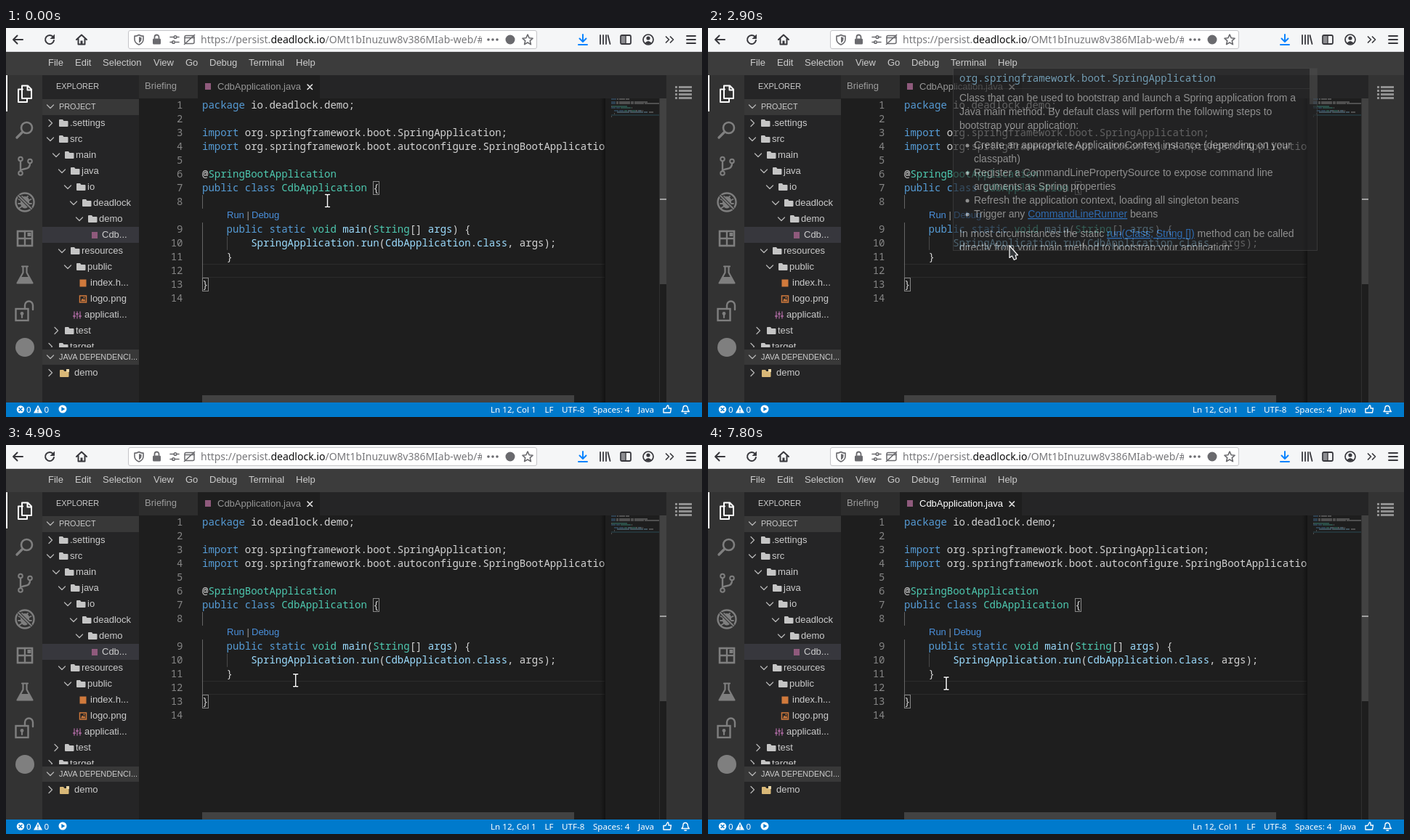
Animation of 958x536 px, one loop 8 s. Source, as an HTML page:

```html
<!DOCTYPE html>
<html lang="en">
<head>
<meta charset="utf-8">
<title>Editor session</title>
<style>
html, body { margin: 0; width: 100%; height: 100%; overflow: hidden; background: #1e1e1e; }
svg { display: block; width: 958px; height: 536px; }
text { white-space: pre; font: 13px "Liberation Sans", Arial, sans-serif; fill: #ccc; }
text.code { font: 14px "Noto Sans Mono", monospace; fill: #d4d4d4; }
text.num { fill: #858585; text-anchor: end; }
text.head { font-size: 10.83px; }
text.doc { font-size: 14px; }
text.status { font: 11.6px "Noto Sans", "Open Sans", sans-serif; fill: #fff; }
text.url { font: 14px "Noto Sans", "Open Sans", sans-serif; fill: #77777a; }
.link { fill: #3794ff; text-decoration: underline; }
.line { fill: none; stroke-linecap: round; stroke-linejoin: round; }
</style>
</head>
<body>
<svg id="stage" viewBox="0 0 958 536"></svg>
<script>
const stage = document.getElementById('stage');
const rect = (x, y, w, h, fill, more = '') =>
  `<rect x="${x}" y="${y}" width="${w}" height="${h}" fill="${fill}" ${more}/>`;
const box = (x, y, w, h, stroke, more = '') => rect(x, y, w, h, 'none', `stroke="${stroke}" ${more}`);
const text = (x, y, s, cls = '', more = '') => `<text x="${x}" y="${y}" class="${cls}" ${more}>${s}</text>`;
const line = (d, stroke, w = 1, more = '') =>
  `<path class="line" d="${d}" stroke="${stroke}" stroke-width="${w}" ${more}/>`;
const shape = (d, fill, more = '') => `<path d="${d}" fill="${fill}" ${more}/>`;
const dot = (x, y, r, fill, more = '') => `<circle cx="${x}" cy="${y}" r="${r}" fill="${fill}" ${more}/>`;
const ring = (x, y, r, stroke, w = 1) => dot(x, y, r, 'none', `stroke="${stroke}" stroke-width="${w}"`);
const group = (id, body, more = '') => `<g id="${id}" ${more}>${body}</g>`;

const KEY = '#569cd6', TYPE = '#4ec9b0', NAME = '#9cdcfe', PLAIN = '#d4d4d4';
const CHAR = 8.4;

// Each line is a list of [text, colour] runs.
const source = [
  [['package', KEY], [' io.deadlock.demo;', PLAIN]],
  [],
  [['import', KEY], [' org.springframework.boot.SpringApplication;', PLAIN]],
  [['import', KEY], [' org.springframework.boot.autoconfigure.SpringBootApplication;', PLAIN]],
  [],
  [['@', PLAIN], ['SpringBootApplication', TYPE]],
  [['public class ', KEY], ['CdbApplication', TYPE], [' {', PLAIN]],
  [],
  [['    public static ', KEY], ['void', TYPE], [' main', NAME], ['(', PLAIN], ['String', TYPE],
    ['[] ', PLAIN], ['args', NAME], [') {', PLAIN]],
  [['        SpringApplication', NAME], ['.', PLAIN], ['run', NAME], ['(', PLAIN], ['CdbApplication', NAME],
    ['.', PLAIN], ['class', NAME], [', args);', PLAIN]],
  [['    }', PLAIN]],
  [],
  [['}', PLAIN]],
  []
];
const lineTop = i => 97 + 19 * i + (i > 7 ? 19 : 0);

function browser() {
  const ink = '#38383d', grey = '#6a6a6e';
  return rect(0, 0, 958, 33, '#f5f6f7') + rect(0, 32, 958, 1, '#d5d5d8') +
    line('M23 16H10M15.500 10.500L10 16l5.500 5.500', ink, 2) +
    line('M65 12.500A6 6 0 1 0 66 17', ink, 2) + shape('M67 8.500v6.500h-6.500z', ink) +
    line('M97 16l7-6.500 7 6.500M99.500 15v7.500h9V15', ink, 2) + rect(102.5, 17.5, 3, 5, ink) +
    rect(168.5, 3.5, 562, 25, '#fff', 'rx="2.500" stroke="#c4c4c8"') +
    line('M183 9.500q3 2 6 1.500v4.500q0 5-6 7.500q-6-2.500-6-7.500v-4.500q3 .5 6-1.500z', grey, 1.6) +
    shape('M183 12v8.500q3.500-2 3.500-5v-2.500q-2 0-3.500-1z', grey) +
    rect(202, 14.5, 11, 8, grey, 'rx="1.500"') + line('M204.500 14v-1.500a3 3 0 0 1 6 0v1.500', grey, 1.8) +
    line('M226 12.500h5M235 12.500h3M226 19.500h3M233 19.500h5', grey, 1.6) +
    ring(233, 12.5, 1.8, grey, 1.5) + ring(230.5, 19.5, 1.8, grey, 1.5) +
    box(246, 10.5, 13, 11, grey, 'rx="2" stroke-width="1.500"') + line('M246 13.500h13M245.500 22.500l14-13', grey, 1.6) +
    text(268, 21, 'https://persist.<tspan fill="#0c0c0d">deadlock.io</tspan>/OMt1bInuzuw8v386MIab-web/#', 'url', 'clip-path="url(#urlClip)"') +
    [664, 670, 676].map(x => dot(x, 16, 1.8, grey)).join('') + dot(694, 16, 6.5, grey) +
    line('M718 9l2.100 4.700 5 .5-3.800 3.400 1.100 5-4.400-2.600-4.400 2.600 1.100-5-3.800-3.400 5-.5z', grey, 1.6) +
    line('M794 9v9.500M789.500 14.500l4.500 4.500 4.500-4.500M788 23h12', '#0a84ff', 2) +
    line('M818 10v12M822 10v12M826 10v12M828.500 10l3 12', ink, 1.8) +
    box(846, 10, 14, 12, ink, 'rx="2" stroke-width="1.800"') + rect(847, 11, 5.5, 10, '#8c8c90') +
    line('M853 10.500v11', ink, 1.5) +
    ring(884, 16, 7, ink, 1.7) + dot(884, 14, 2.6, ink) + shape('M879.500 20.500q4.500-5 9 0q-4.500 3.500-9 0z', ink) +
    line('M908.500 12l4 4-4 4M914.500 12l4 4-4 4', ink, 1.7) +
    line('M937 11h12M937 16h12M937 21h12', ink, 1.8);
}

function menu() {
  const items = [[58, 'File'], [95, 'Edit'], [133, 'Selection'], [203, 'View'], [247, 'Go'],
    [280, 'Debug'], [334, 'Terminal'], [399, 'Help']];
  return rect(0, 33, 958, 33, '#3c3c3c') + items.map(([x, s]) => text(x, 52, s)).join('');
}

function activity() {
  const c = '#7f7f7f';
  return rect(0, 65, 50, 451, '#333') + rect(0, 65, 2, 50, '#fff') +
    line('M23 84.500h-6V102h12v-4', '#fff', 2) + line('M22 79.500h8l5 5V97H22zM29.500 80v5.500h5', '#fff', 2) +
    ring(28.5, 137.5, 7.5, c, 2.6) + line('M22.500 143.500L15 151', c, 3.4) +
    ring(20, 180.5, 2.8, c, 2) + ring(33, 183.5, 2.8, c, 2) + ring(20, 200, 2.8, c, 2) +
    line('M20 184v12.500M33 187q0 6-6.500 7t-6.500 3', c, 2.4) +
    ring(26, 240, 12.5, c, 2.4) + shape('M20 241a6 7.500 0 0 0 12 0v-3a6 6 0 0 0-12 0z', c) +
    line('M17.500 236l3 1.500M17 242h3M18.500 248l3-2M34.500 236l-3 1.500M35 242h-3M33.500 248l-3-2M22 232l2 2M30 232l-2 2', c, 1.8) +
    line('M17.500 231.500l17 17', '#333', 4) + line('M17 231l18 18', c, 2) +
    box(16, 280, 20, 20, c, 'stroke-width="2.600"') + line('M26 280v20M16 290h20', c, 2.4) +
    rect(27.5, 281.5, 7, 7, '#333') + rect(29.5, 282, 5, 5, c) +
    line('M22 328.500h8M23.500 329v8l-8 14.500h21l-8-14.500v-8', c, 2.2) + shape('M20.500 343h11l4.500 8h-20z', c) +
    box(13.5, 387, 17, 16, c, 'stroke-width="2.400"') + dot(22, 393.5, 2.4, c) + line('M22 394v5', c, 2.2) +
    line('M26 387v-5a5.500 5.500 0 0 1 11 0v6', c, 2.4) +
    dot(26, 440, 13, c);
}

const chevron = (x, y, open) =>
  line(open ? `M${x - 4.5} ${y - 2}l4.500 4.500 4.500-4.500` : `M${x - 2} ${y - 4.5}l4.500 4.500-4.500 4.500`, '#b4b4b4', 1.3);
const folder = (x, y, fill = '#c5c5c5') =>
  shape(`M${x - 6} ${y - 4}q0-1 1-1h4l1.500 2h5q1 0 1 1v6q0 1-1 1h-10.500q-1 0-1-1z`, fill);

function sidebar() {
  // name, depth, kind
  const rows = [['.settings', 0, 'shut'], ['src', 0, 'open'], ['main', 1, 'open'], ['java', 2, 'open'],
    ['io', 3, 'open'], ['deadlock', 4, 'open'], ['demo', 5, 'open'], ['Cdb...', 5.5, 'class'],
    ['resources', 2, 'open'], ['public', 3, 'open'], ['index.h...', 3.5, 'page'], ['logo.png', 3.5, 'image'],
    ['applicati...', 2.5, 'config'], ['test', 1, 'shut'], ['target', 0, 'shut']];
  const icons = {
    class: (x, y) => rect(x - 4, y - 4, 8, 9, '#8f5a7c'),
    page: (x, y) => rect(x - 4.5, y - 4.5, 9, 10, '#d07a3c'),
    image: (x, y) => box(x - 4.5, y - 4, 9, 9, '#d07a3c', 'stroke-width="1.500"') +
      shape(`M${x - 3} ${y + 3.5}l2-4 2 2 1-1.500 1.500 3.500z`, '#d07a3c') + dot(x + 1.5, y - 1.5, 1, '#d07a3c'),
    config: (x, y) => line(`M${x - 4} ${y - 4}v9M${x} ${y - 4}v9M${x + 4} ${y - 4}v9`, '#a5669a', 1.3) +
      line(`M${x - 5} ${y + 2}h2M${x - 1} ${y - 1}h2M${x + 3} ${y + 2}h2`, '#a5669a', 2)
  };
  const tree = rows.map(([name, depth, kind], i) => {
    const y = 131 + 22 * i, x = 61 + 8 * depth, dir = kind === 'open' || kind === 'shut';
    const tx = dir ? x + 27 : x + 27;
    return (dir ? chevron(x, y, kind === 'open') + folder(x + 18, y) : icons[kind](x + 17, y)) +
      text(tx, y + 4, name);
  }).join('');
  return rect(50, 65, 133, 451, '#252526') + text(69, 84, 'EXPLORER', 'head') +
    rect(50, 98, 133, 22, '#383838') + chevron(61, 108, true) + text(73, 112, 'PROJECT', 'head') +
    rect(50, 274, 133, 22, '#37373d') + `<g clip-path="url(#treeClip)">${tree}</g>` +
    rect(50, 443, 133, 21, '#383838') + chevron(61, 453, true) +
    text(73, 457, 'JAVA DEPENDENCI...', 'head') +
    chevron(61, 475, false) + folder(80, 476, '#d9b877') + rect(83, 470, 4, 4, '#e8d6a8') + text(94, 479, 'demo');
}

function tabs() {
  return rect(183, 65, 726, 32, '#252526') + rect(183, 65, 81, 32, '#2d2d2d') + rect(264, 65, 168, 32, '#1e1e1e') +
    text(191, 84, 'Briefing', '', 'fill-opacity=".7"') + rect(274, 76, 8, 9, '#8f5a7c') +
    text(291, 85, 'CdbApplication.java', '', 'id="tabName"') +
    line('M415 78l6.500 6.500M421.500 78l-6.500 6.500', '#e8e8e8', 1.6);
}

function minimap() {
  return source.map((runs, i) => {
    let col = 0;
    return runs.map(([s, fill]) => {
      const out = [...s.matchAll(/[\w@;{}()[\]]+/g)].map(m =>
        rect(833 + col + m.index, 97.5 + 2 * i, m[0].length, 1, fill, 'opacity=".55"')).join('');
      col += s.length;
      return out;
    }).join('');
  }).join('');
}

function editor() {
  const code = source.map((runs, i) => runs.length
    ? text(270, lineTop(i) + 14, runs.map(([s, c]) => `<tspan fill="${c}">${s}</tspan>`).join(''), 'code') : '').join('');
  const nums = source.map((_, i) => text(243.5, lineTop(i) + 14, i + 1, 'code num')).join('');
  return rect(183, 97, 726, 419, '#1e1e1e') + nums +
    line('M270 325.500H824M270 343.500H824', '#2c2c2c') +
    line('M270.500 230.500v18M270.500 268.500v75', '#666', 1) + line('M304.500 287.500v18', '#484848') +
    box(505.5, 211.5, 8, 18, '#888') + box(270.5, 344.500, 8, 18, '#888') +
    `<g clip-path="url(#codeClip)">${code}</g>` +
    text(304, 262, 'Run', '', 'id="run" fill-opacity="1" style="fill:#4a90dc"') +
    text(331.500, 262, '|', '', 'style="fill:#999"') + text(338, 262, 'Debug', '', 'style="fill:#4a90dc"') +
    rect(270, 325, 2, 19, '#d0d0d0', 'id="caret"') +
    rect(818, 97, 7, 419, 'url(#edge)') +
    rect(833, 119.5, 66, 1, '#2b4b55') + `<g clip-path="url(#mapClip)">${minimap()}</g>` +
    rect(899, 97, 1, 419, '#303030') + rect(900, 97, 9, 256, '#424242') + rect(900, 235, 9, 2, '#a0a0a0') +
    rect(270, 506, 512, 10, '#424242') +
    rect(909, 65, 49, 451, '#333') +
    [81.5, 86.5, 91.5, 96.5].map(y => rect(921, y - 1.5, 3, 3, '#909090') + rect(926, y - 1.5, 18, 3, '#909090')).join('');
}

const playIcon = x => dot(x, 525, 5.5, '#fff') + shape(`M${x - 1.7} 522l5 3-5 3z`, '#007acc');

function status() {
  return rect(0, 516, 958, 20, '#007acc') +
    dot(20, 525.5, 5.2, '#fff') + line('M18 523.500l4 4M22 523.500l-4 4', '#007acc', 1.5) + text(28, 530, '0', 'status') +
    shape('M44 519.500l6 11h-12z', '#fff') + line('M44 523.500v3M44 528.500v.3', '#007acc', 1.4) + text(52.500, 530, '0', 'status') +
    group('idle', playIcon(78)) +
    group('busy', group('spin', line('M71.500 524.500a4.700 4.700 0 0 1 8.500-2M80.500 526.500a4.700 4.700 0 0 1-8.500 2', '#fff', 1.7) +
      shape('M82 519.500v4.500h-4.500zM70 531.500V527h4.500z', '#fff')) +
      text(84, 530, ': Compiling workspace...', 'status') + playIcon(234)) +
    [[667, 'Ln 12, Col 1'], [741.5, 'LF'], [765, 'UTF-8'], [808, 'Spaces: 4'], [870, 'Java']]
      .map(([x, s]) => text(x, 530, s, 'status')).join('') +
    line('M905 524.500h3l2.500-4.500q2 0 1.500 4h3.500l-1 6h-9.500z', '#fff', 1.4) +
    line('M930 528.500q2-1.500 2-4.500a3.200 3.500 0 0 1 6.400 0q0 3 2 4.500z', '#fff', 1.4) + line('M934 531h2.500', '#fff', 1.5);
}

function hover() {
  const link = s => `<tspan class="link">${s}</tspan>`;
  const body = [
    [346, 101, 'Class that can be used to bootstrap and launch a Spring application from a'],
    [346, 120, 'Java main method. By default class will perform the following steps to'],
    [346, 139, 'bootstrap your application:'],
    [366, 166, 'Create an appropriate ApplicationContext instance (depending on your'],
    [366, 185, 'classpath)'],
    [366, 204, 'Register a CommandLinePropertySource to expose command line'],
    [366, 223, 'arguments as Spring properties'],
    [366, 242, 'Refresh the application context, loading all singleton beans'],
    [366, 261, `Trigger any ${link('CommandLineRunner')} beans`],
    [346, 288, `In most circumstances the static ${link('run(Class, String [])')} method can be called`],
    [346, 307, 'directly from your main method to bootstrap your application:']
  ];
  return rect(337.5, 55.5, 501, 251, '#252526', 'stroke="#454545"') + line('M338 83.500h490', '#3a3a3b') +
    text(346, 74, 'org.springframework.boot.SpringApplication', 'code', `style="fill:${NAME}"`) +
    `<g clip-path="url(#hoverClip)">${body.map(([x, y, s]) => text(x, y, s, 'doc')).join('')}</g>` +
    [162, 200, 238, 257].map(y => dot(357, y, 2.5, '#ccc')).join('') + rect(828, 56, 10, 49, '#4a4a4a');
}

function pointers() {
  const edge = 'stroke="#fff" stroke-width="1.200" stroke-linejoin="round"';
  const beam = 'M-3 -8.500h2q1 0 1 1v15q0 1-1 1h-2M3 -8.500h-2q-1 0-1 1M3 8.500h-2q-1 0-1-1';
  return group('beam', line(beam, '#111', 3.4) + line(beam, '#fff', 1.5)) +
    group('arrow', shape('M.5 .5V17l3.500-2.500 2.800 5.500 3.200-1.500-1.200-5H12z', '#35383b', edge)) +
    group('hand', shape('M-1.500 1q1.500-1.700 3 0l3 5.500 5-.2q3 .5 4 4v8.200q-1 1.500-2 1.500h-7q-2-2-5.500-3.500-4-1.500-2.500-3l4 .5z', '#35383b', edge) +
      line('M7 7l1 3M10 7l.8 2.800', '#888', .8));
}

const clip = (id, x, y, w, h) => `<clipPath id="${id}">${rect(x, y, w, h, '#000')}</clipPath>`;
stage.innerHTML = '<defs>' + clip('urlClip', 260, 0, 395, 32) + clip('treeClip', 50, 120, 133, 320) +
  clip('codeClip', 260, 97, 564, 409) + clip('mapClip', 825, 97, 74, 100) + clip('hoverClip', 338, 56, 490, 250) +
  '<linearGradient id="edge"><stop stop-opacity="0"/><stop offset="1" stop-opacity=".4"/></linearGradient></defs>' +
  menu() + activity() + sidebar() + tabs() + editor() + status() +
  group('hover', hover()) + browser() + pointers();

const el = id => document.getElementById(id);
const show = (id, on) => el(id).setAttribute('visibility', on ? 'visible' : 'hidden');

// time, x, y of the pointer's hot spot
const path = [[1200, 442.5, 238], [1500, 443, 257], [1600, 443, 257], [2300, 416, 299], [2800, 416, 299],
  [2900, 414.5, 299.5], [4500, 414.5, 299.5], [4700, 412, 305], [5000, 392, 334], [5400, 358, 292],
  [5600, 325, 262], [5900, 318.5, 253.5], [7200, 318.5, 253.5], [7600, 328, 328.5]];

function pointerAt(t) {
  const i = path.findIndex(p => p[0] >= t);
  if (i === 0) return path[0].slice(1);
  if (i < 0) return path[path.length - 1].slice(1);
  const [t0, x0, y0] = path[i - 1], [t1, x1, y1] = path[i], k = (t - t0) / (t1 - t0);
  return [x0 + (x1 - x0) * k, y0 + (y1 - y0) * k];
}

function draw(ms) {
  const t = Math.floor((ms % 8000) / 100) * 100;  // screen refreshes ten times a second
  const within = (a, b) => t >= a && t < b;
  const [x, y] = pointerAt(t);
  const kind = within(2900, 4800) ? 'arrow' : within(5600, 7300) ? 'hand' : 'beam';
  for (const id of ['beam', 'arrow', 'hand']) show(id, id === kind);
  el(kind).setAttribute('transform', `translate(${x} ${y})`);

  show('hover', within(2900, 4900));
  el('hover').setAttribute('opacity', t < 3000 ? .65 : t < 3100 ? .9 : 1);
  el('run').style.textDecoration = kind === 'hand' ? 'underline' : 'none';
  el('tabName').style.fill = t < 6100 ? '#979797' : '#fff';
  show('caret', t >= 6300 && Math.floor((t - 6300) / 500) % 2 === 0);

  const busy = within(6800, 7600);
  show('busy', busy);
  show('idle', !busy);
  el('spin').setAttribute('transform', `rotate(${(t - 7100) * .18} 76 525.500)`);
}

function tick(now) {
  draw(now);
  requestAnimationFrame(tick);
}
draw(0);
requestAnimationFrame(tick);
</script>
</body>
</html>
```
